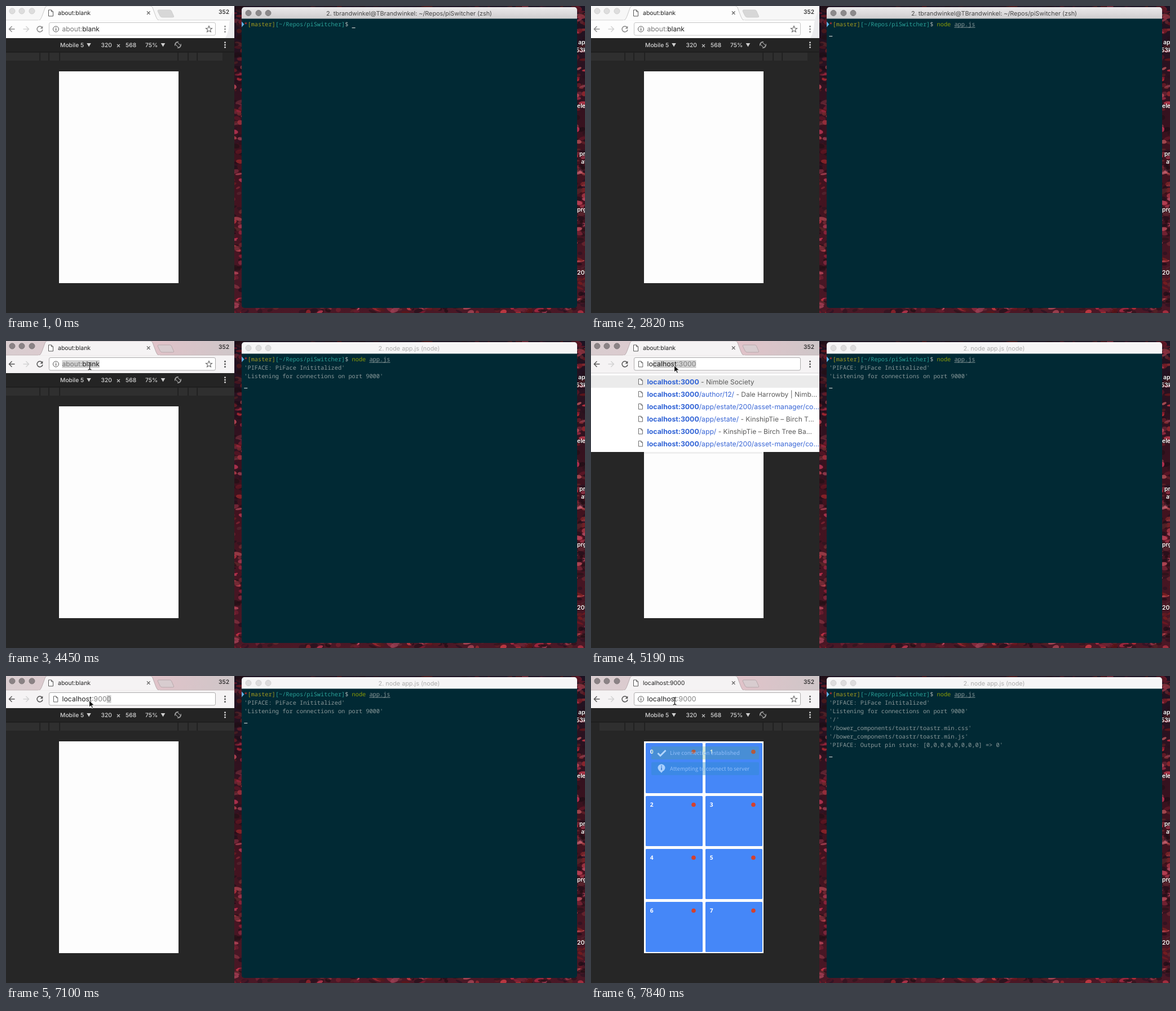
An HTML page with a canvas that plays this animation: 1027 by 545 pixels, repeating every 7990 ms.

```html
<!DOCTYPE html>
<html lang="en">
<head>
<meta charset="utf-8">
<title>Terminal and browser</title>
<style>
html, body { margin: 0; width: 100%; height: 100%; overflow: hidden; background: #262626; }
canvas { display: block; }
</style>
</head>
<body>
<canvas width="1027" height="545"></canvas>
<script>
const W = 1027, H = 545, LOOP = 7990;
const screen = document.querySelector('canvas').getContext('2d');
let g = screen;

const UI = 'Inter, Roboto, sans-serif';
const MONO = '"Noto Sans Mono", "DejaVu Sans Mono", monospace';
const CELL = 6.17, ROW = 15;

// Value of the last step whose start time has passed.
const at = (t, steps) => steps.filter(s => s[0] <= t).pop()[1];

function rect(x, y, w, h, fill) {
  g.fillStyle = fill;
  g.fillRect(x, y, w, h);
}
function round(x, y, w, h, r, fill, stroke) {
  g.beginPath();
  g.roundRect(x, y, w, h, r);
  paint(fill, stroke);
}
function circle(x, y, r, fill, stroke) {
  g.beginPath();
  g.arc(x, y, r, 0, 7);
  paint(fill, stroke);
}
function shape(d, x, y, fill, stroke, width) {
  g.save();
  g.translate(x, y);
  const path = new Path2D(d);
  if (fill) { g.fillStyle = fill; g.fill(path); }
  if (stroke) { g.strokeStyle = stroke; g.lineWidth = width || 1; g.stroke(path); }
  g.restore();
}
function paint(fill, stroke) {
  if (fill) { g.fillStyle = fill; g.fill(); }
  if (stroke) { g.strokeStyle = stroke; g.lineWidth = 1; g.stroke(); }
}
// Draws a run of text and returns where it ends.
function text(s, x, y, size, color, weight = 400, family = UI) {
  g.font = `${weight} ${size}px ${family}`;
  g.fillStyle = color;
  g.fillText(s, x, y);
  return x + g.measureText(s).width;
}
function gradient(x0, y0, x1, y1, ...colors) {
  const fill = g.createLinearGradient(x0, y0, x1, y1);
  colors.forEach((c, i) => fill.addColorStop(i / (colors.length - 1), c));
  return fill;
}

// ---- Desktop ----
function makeWallpaper() {
  const canvas = document.createElement('canvas');
  canvas.width = W;
  canvas.height = H;
  g = canvas.getContext('2d');
  let seed = 11;
  const rnd = () => (seed = seed * 16807 % 2147483647) / 2147483647;
  rect(0, 0, W, H, gradient(0, 0, 0, H, '#1c1222', '#40121e', '#4a1826'));
  for (let i = 0; i < 4200; i++) {
    const x = 400 + rnd() * 630, y = rnd() * H, k = rnd();
    const glow = Math.min(1, .2 + y / 200 + (x > 900 ? .4 : 0));
    const dark = k < .4;
    g.beginPath();
    g.ellipse(x, y, 3 + rnd() * 6, 1.5 + rnd() * 3, rnd() - .5, 0, 7);
    g.fillStyle = dark
      ? `hsla(${315 + rnd() * 30}, 38%, ${8 + rnd() * 5}%, .7)`
      : `hsla(${345 + rnd() * 14}, ${40 + rnd() * 25}%, ${14 + k * k * 44 * glow}%, .8)`;
    g.fill();
  }
  const labels = [['ap', 1015, 68], ['53k', 1011, 82], ['ele', 1013, 181], ['pr', 1017, 266],
    ['at', 1020, 280], ['prg', 1013, 365], ['201', 1013, 477]];
  g.shadowColor = '#000';
  g.shadowBlur = 3;
  labels.forEach(([s, x, y]) => text(s, x, y, 10.4, '#fff', 600));
  return canvas;
}

// ---- Terminal ----
const OUTPUT = [
  "'PIFACE: PiFace Inititalized'",
  "'Listening for connections on port 9000'",
  "'/'",
  "'/bower_components/toastr/toastr.min.css'",
  "'/bower_components/toastr/toastr.min.js'",
  "'PIFACE: Output pin state: [0,0,0,0,0,0,0,0] => 0'"
];
const FILES = [
  ['README.md', 'bower_components/', 'npm-debug.log', 'piface-stub.js'],
  ['app.js', 'index.html', 'package.json'],
  ['bower.json', 'node_modules/', 'piSwitcher-demo.gif']
];
const COMMAND = [[0, ''], [590, 'n'], [740, 'no'], [890, 'node'], [1040, 'node '], [1330, 'node p'],
  [1780, 'node '], [1930, 'node a'], [2070, 'node ap'], [2220, 'node app.js ']];
const LINES = [[0, 0], [2970, 1], [3110, 2], [7550, 3], [7690, 5], [7840, 6]];
const GREY = '#8b999a';

function term(s, col, row, color = GREY, weight = 500) {
  [...s].forEach((c, i) => text(c, 422.3 + (col + i) * CELL, 36 + row * ROW, 10.3, color, weight, MONO));
  return col + s.length;
}

function terminal(t, focused) {
  round(418, 2, 595, 534, 5, '#012934');
  round(418, 2, 595, 20.5, [5, 5, 0, 0], focused ? gradient(0, 2, 0, 22, '#ebe9eb', '#cfcdcf') : '#f6f5f6');
  [430, 448, 465].forEach(x => circle(x, 12.5, 5, focused ? '#8b898b' : '#dddcdd', focused ? '#807e80' : '#d0cfd0'));
  g.textAlign = 'center';
  text(t < 2970 ? '2. tbrandwinkel@TBrandwinkel: ~/Repos/piSwitcher (zsh)' : '2. node app.js (node)',
    715, 16.8, 10.8, focused ? '#444' : '#adadad');
  g.textAlign = 'left';

  shape('M0 0L4.5 5L0 10Z', 418, 27.5, '#62b5ea');
  let col = term('*', 0, 0, '#dc322f');
  col = term('[master]', col, 0, '#a2991f');
  col = term('[~/Repos/piSwitcher]', col, 0, '#2aa198');
  col = term('$ ', col, 0, '#a5aeae');

  const command = at(t, COMMAND), name = command.slice(0, 4), arg = command.slice(5);
  term(name, col, 0, name === 'node' ? '#8a9c06' : '#dc322f');
  term(arg, col + 5, 0);
  if (arg[0] === 'a') rect(422.3 + (col + 5) * CELL, 37.5, arg.trim().length * CELL, 1, GREY);

  if (t >= 1180 && t < 2820) FILES.forEach((row, r) => row.forEach((file, c) => {
    const folder = file.endsWith('/');
    const end = term(folder ? file.slice(0, -1) : file, c * 21, r + 1, folder ? '#e2541b' : GREY, folder ? 600 : 500);
    if (folder) term('/', end, r + 1);
  }));

  const count = at(t, LINES);
  OUTPUT.slice(0, count).forEach((line, i) => term(line, 0, i + 1));
  const running = t >= 2820;
  rect(422.3 + (running ? 0 : col + command.length) * CELL, 38 + (running ? 1 + count : 0) * ROW, 6, 1.3, '#b9c2c2');
}

// ---- Browser ----
const TYPED = [[0, 0], [5040, 1], [5190, 2], [5330, 3], [5480, 4], [5620, 5], [5920, 7], [6060, 9],
  [6660, 10], [6810, 11], [6960, 12], [7100, 13], [7250, 14]];
const HITS = [
  ['', ' - Nimble Society'],
  ['/author/12/', ' - Dale Harrowby | Nimb...'],
  ['/app/estate/200/asset-manager/co...', ''],
  ['/app/estate/', ' - KinshipTie – Birch T...'],
  ['/app/', ' - KinshipTie – Birch Tree Ba...'],
  ['/app/estate/200/asset-manager/co...', '']
];

const pageIcon = (x, y, s = 1) => {
  g.save();
  g.translate(x, y);
  g.scale(s, s);
  shape('M.5 .5H5.5L8.5 3.5V11.5H.5ZM5.5 .5V3.5H8.5', 0, 0, '#fff', '#555');
  g.restore();
};
const dots = (x, y, gap, color) => [-gap, 0, gap].forEach(d => circle(x, y + d, 1.5, color));

function address(t) {
  const typed = at(t, TYPED);
  const url = typed ? `localhost:${t < 6810 ? 3000 : 9000}` : 'about:blank';
  const size = typed ? 12.3 : 12, x = 99.5;
  g.font = `400 ${size}px ${UI}`;
  const width = n => g.measureText(url.slice(0, n)).width;
  const selecting = typed ? typed < 14 : t >= 4300;
  if (selecting) rect(x + width(typed), 34, width(url.length) - width(typed), 14, '#d2d2d2');
  const split = typed ? 9 : 6;
  const end = text(url.slice(0, split), x, 45.3, size, typed ? '#222' : '#777');
  text(url.slice(split), end, 45.3, size, typed ? '#808080' : '#222');

  if (typed && t < 7550) pageIcon(84, 35.5, .92);
  else {
    circle(88.5, 41, 5, null, '#555');
    rect(88, 40, 1.2, 4, '#555');
    rect(88, 38, 1.2, 1.2, '#555');
  }
}

function toolbar(t, focused) {
  rect(0, 0, 405, 25, focused ? gradient(0, 0, 405, 0, '#d9cdd0', '#dec9ce', '#e0c3c9', '#cec6c8') : '#f7f7f7');
  [11, 28, 46].forEach(x => circle(x, 9, 5, focused ? '#8a8285' : '#dddddd', focused ? '#7d7678' : '#cfcfcf'));
  const bar = focused ? '#f5f3f4' : '#fdfdfd';
  rect(0, 25, 405, 32, bar);
  rect(0, 24.5, 405, 1, focused ? '#c3b5b8' : '#d6d6d6');
  shape('M58 26C62 24 63 20 65 15L69 4Q70 0 73 0H256Q259 0 260 3L266 19Q268 25 272 26Z', 0, 0, bar, focused ? '#b9acaf' : '#c9c9c9');
  rect(57, 25.2, 216, 3, bar);
  shape('M2 0H22Q24 0 25 2L29 11Q30 13 27 13H9Q6 13 5 11L1 3Q0 0 2 0Z', 268.5, 7, focused ? '#d8cccf' : '#d7d7d7', focused ? '#b9a9ad' : '#cfcfcf');
  pageIcon(75, 6.5);
  text(t < 7400 ? 'about:blank' : 'localhost:9000', 92, 16.3, 10.5, '#222');
  shape('M0 0L5.5 5.5M5.5 0L0 5.5', 250, 9.5, null, '#666', 1.2);
  text('352', 377, 13.5, 10.3, '#222', 500);
  if (!focused) shape('M399 18L405 4V57H389Q396 45 396 30Z', 0, 0, '#ececee');

  const arrow = 'M10.5 5H.8M5.5 0L.5 5L5.5 10';
  shape(arrow, 5, 36, null, focused ? '#555' : '#8a8a8a', 1.4);
  g.save();
  g.scale(-1, 1);
  shape(arrow, -41, 36, null, '#d2d2d2', 1.4);
  g.restore();
  shape('M4 -3.2A5 5 0 1 0 5 1', 60, 41, null, focused ? '#555' : '#8a8a8a', 1.5);
  shape('M5.3 -5.5V-.8H.6Z', 60, 41, focused ? '#555' : '#8a8a8a');
  round(76.5, 29.5, 295, 22.5, 2.5, '#fff', focused ? '#adabac' : '#c6c6c6');
  address(t);
  if (at(t, TYPED) === 0 || t >= 7250)
    shape('M0 -5.5L1.6 -1.8L5.5 -1.5L2.5 1.1L3.4 5L0 2.9L-3.4 5L-2.5 1.1L-5.5 -1.5L-1.6 -1.8Z', 360, 41, null, '#666', 1.1);
  dots(388.5, 41, 4.7, focused ? '#555' : '#909090');
}

function deviceBar(t) {
  rect(0, 57, 405, 24.5, '#242424');
  rect(0, 81, 405, 1.2, '#1b1b1b');
  const left = t < 7840 ? 0 : 15, right = t < 4150 ? 384 : 405;
  rect(left, 83, right - left, 14, '#2f2f2f');
  [60, 76, 95, 305, 323, 339].forEach(x => rect(x - .7, 83, 1.6, 14, '#1f1f1f'));
  [['Mobile 5', 96], ['320', 168.5], ['568', 212], ['75%', 247]].forEach(([s, x]) => text(s, x, 72.6, 10.3, '#d6d6d6', 500));
  [147, 278.5].forEach(x => shape('M-3.8 -3H3.8L0 3.5Z', x, 69, '#d0d0d0'));
  shape('M0 0L5 5M5 0L0 5', 197, 68, null, '#c4c4c4', 1.1);
  g.save();
  g.translate(305, 69);
  g.rotate(-Math.PI / 4);
  round(-2.5, -4.5, 5, 9, 1, null, '#aaa');
  g.restore();
  shape('M-5.2 1.8A5.5 5.5 0 0 1 1 -5.4M5.2 -1.8A5.5 5.5 0 0 1 -1 5.4', 305, 69, null, '#aaa', 1.1);
  dots(388.5, 69, 4.3, '#d0d0d0');
}

function switches() {
  for (let i = 0; i < 8; i++) {
    const x = 97 + i % 2 * 106, y = 119 + (i >> 1) * 94;
    round(x, y, 101, 89, 1.5, '#4587f8');
    text(i, x + 7.8, y + 18.8, 10.3, '#fff', 700, '"Noto Sans", sans-serif');
    circle(x + 85, y + 15.5, 3.8, '#d3412e');
  }
  [['Live connection established', 125, 'rgba(81,163,110,.25)'],
   ['Attempting to connect to server', 153, 'rgba(47,140,200,.4)']].forEach(([s, y, fill]) => {
    round(107, y, 191, 23, 2, fill);
    text(s, 140, y + 15.3, 9.6, '#8fbdfa', 400, '"Noto Sans CJK JP", "Noto Sans CJK SC", "Open Sans", sans-serif');
  });
  shape('M0 5L4.5 9.5L14 0', 118.5, 132, null, '#b3d6ff', 3);
  circle(125, 163, 6.5, '#a9d0ff');
  shape('M121 168L125 172L128 168Z', 0, 0, '#a9d0ff');
  rect(124.2, 162, 1.8, 5, '#4587dd');
  rect(124.2, 159, 1.8, 1.8, '#4587dd');
}

function suggestions(t) {
  const port = t < 6810 ? 3000 : 9000;
  const rows = port === 3000 ? HITS : [['', '']];
  const height = 8 + rows.length * 22;
  rect(0, 57, 405, height, '#fff');
  rect(0, 56.5, 405, 1, '#d4d2d3');
  rect(0, 61, 405, 22, '#ebebeb');
  rect(94, 57 + height, 212, 3, 'rgba(0,0,0,.06)');
  g.save();
  g.beginPath();
  g.rect(0, 57, 405, height);
  g.clip();
  rows.forEach(([path, title], i) => {
    const y = 76.5 + i * 22;
    pageIcon(84, y - 9.5, .88);
    let x = text('localhost:' + port, 99.5, y, 12.3, '#2f62d6', 700);
    x = text(path, x, y, 12.2, '#3a67d6');
    text(title, x, y, 12, '#5c5c5c');
  });
  g.restore();
}

function browser(t, focused) {
  rect(0, 0, 405, H, '#262626');
  toolbar(t, focused);
  deviceBar(t);
  rect(94, 116, 212, 376, '#fdfdfd');
  if (t >= 7840) switches();
  if (t >= 5040 && t < 7100) suggestions(t);
}

// ---- Pointer ----
function pointer(t) {
  if (t < 3410) return;
  const p = Math.min(1, Math.floor((t - 3410) / 148) / 4);
  const rest = (1 - p) ** 2;
  const x = 148 + 190 * rest, y = 44 + 150 * rest;
  const beam = p === 1 && (t < 5040 || t >= 7690);
  if (beam) {
    const d = 'M-3 -6Q0 -6 0 -4Q0 -6 3 -6M0 -4V5M-3 7Q0 7 0 5Q0 7 3 7';
    shape(d, x + .5, y, null, 'rgba(255,255,255,.8)', 2.6);
    shape(d, x + .5, y, null, '#111', 1.2);
  } else shape('M0 0V12.5L3 9.8L5 14.3L7 13.4L5.1 9H9Z', x - .5, y - 1, '#111', '#fff', 1);
}

const wallpaper = makeWallpaper();
g = screen;
g.textRendering = 'geometricPrecision';

function frame() {
  const t = performance.now() % LOOP, browsing = t >= 4150;
  g.drawImage(wallpaper, 0, 0);
  terminal(t, !browsing);
  browser(t, browsing);
  pointer(t);
  requestAnimationFrame(frame);
}
frame();
</script>
</body>
</html>
```
